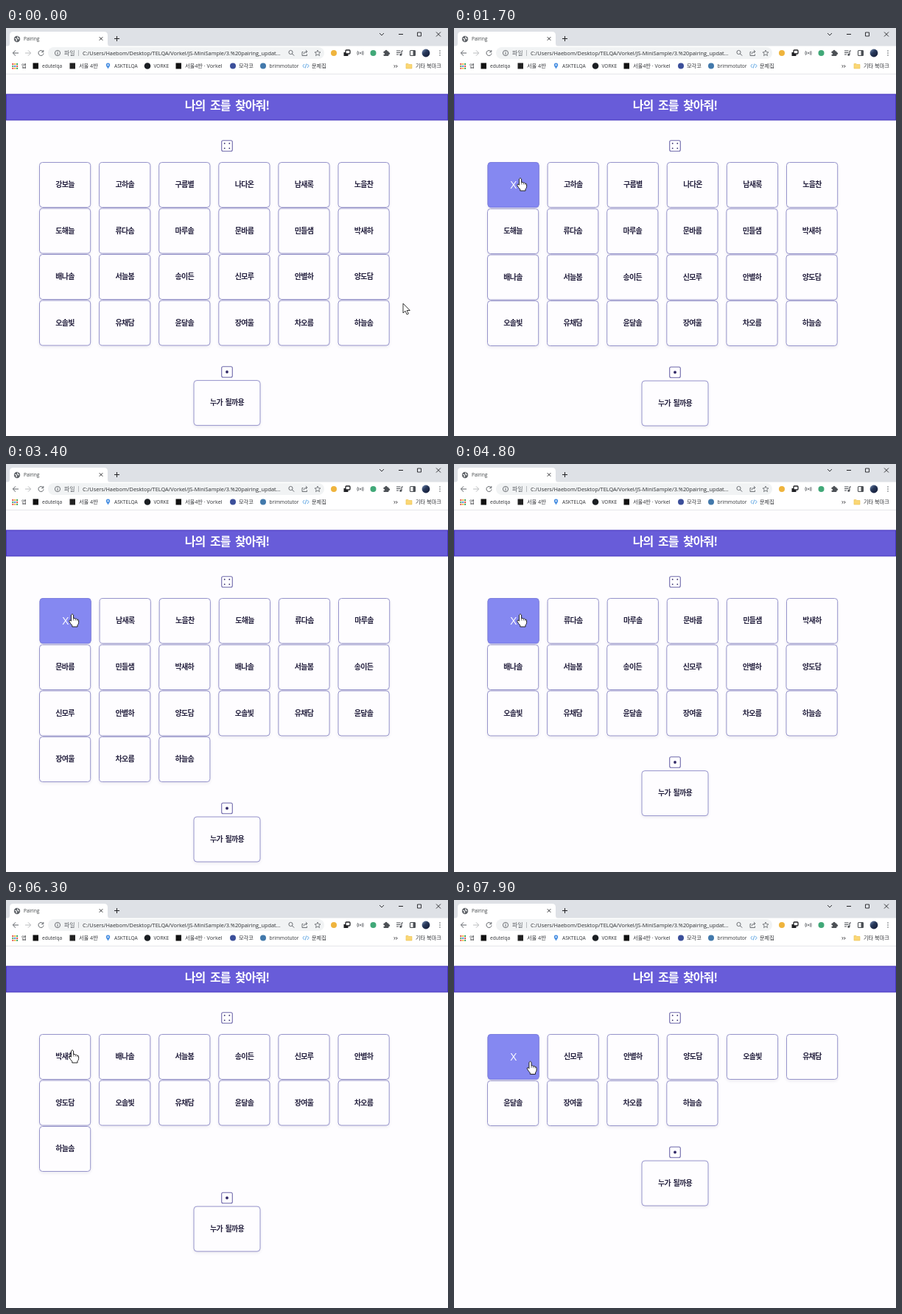
Recreate the animation shown at these times as an HTML page with a canvas. Size 600 by 554 pixels, loop 8 s.

```html
<!DOCTYPE html>
<html lang="ko">
<head>
<meta charset="utf-8">
<title>Pairing</title>
<style>
html, body { margin: 0; width: 100%; height: 100%; overflow: hidden; background: #fefdff; }
canvas { display: block; }
</style>
</head>
<body>
<canvas id="stage" width="600" height="554"></canvas>
<script>
const c = document.getElementById('stage').getContext('2d');
const LOOP = 8000;
const INK = '#5f6368', DARK = '#202124', PAGE = '#fefdff', LINE = '#8b88c6';
const KR = '"Noto Sans CJK KR", "Noto Sans CJK", sans-serif';
const UI = '"Open Sans", ' + KR;
const names = ('강보늘 고하솔 구름별 나다온 남새록 노을찬 도해늘 류다솜 마루솔 문바름 민들샘 박새하 ' +
  '배나솔 서늘봄 송이든 신모루 안별하 양도담 오솔빛 유채담 윤달솔 장여울 차오름 하늘솜').split(' ');
const clicks = [2000, 2750, 3100, 3750, 4100, 4450, 5000, 5300, 5600, 5900, 6220, 6700, 7050, 7400];

// pointer path: time, x, y
const path = [[0, 539, 374], [150, 539, 374], [850, 242, 134], [950, 242, 134],
  [1500, 90, 203.5], [7500, 90, 203.5], [7800, 103.5, 219]];

const clamp = v => Math.max(0, Math.min(1, v));

function pointer(t) {
  let i = 0;
  while (i < path.length - 1 && path[i + 1][0] <= t) i++;
  const a = path[i], b = path[i + 1] || a;
  const p = b === a ? 0 : (t - a[0]) / (b[0] - a[0]);
  const e = p * p * (3 - 2 * p);
  return [a[1] + (b[1] - a[1]) * e, a[2] + (b[2] - a[2]) * e];
}

function text(s, x, y, font, color = DARK, align = 'left', spacing = 0, words = 0) {
  c.font = font;
  c.textAlign = align;
  c.letterSpacing = spacing + 'px';
  c.wordSpacing = words + 'px';
  c.fillStyle = color;
  c.fillText(s, x, y);
}

function rect(x, y, w, h, fill) {
  c.fillStyle = fill;
  c.fillRect(x, y, w, h);
}

function round(x, y, w, h, r, fill, line, width = 1) {
  c.beginPath();
  c.roundRect(x, y, w, h, r);
  paint(fill, line, width);
}

function dot(x, y, r, fill, line, width = 1) {
  c.beginPath();
  c.arc(x, y, r, 0, 7);
  paint(fill, line, width);
}

function paint(fill, line, width) {
  if (fill) { c.fillStyle = fill; c.fill(); }
  if (line) { c.strokeStyle = line; c.lineWidth = width; c.stroke(); }
}

function shape(d, x, y, fill, line, width = 1) {
  const p = new Path2D(d);
  c.save();
  c.translate(x, y);
  c.lineJoin = 'round';
  if (fill) { c.fillStyle = fill; c.fill(p); }
  if (line) { c.strokeStyle = line; c.lineWidth = width; c.stroke(p); }
  c.restore();
}

const icon = (d, x, y, color = INK, width = 1) => shape(d, x, y, null, color, width);

function tabStrip() {
  rect(0, 0, 600, 25, '#dee1e6');
  shape('M0 20 Q4 20 4 16 V5 Q4 0 9 0 H132 Q137 0 137 5 V16 Q137 20 141 20 Z', 1, 5, '#fff');
  dot(15, 15, 4.2, INK);
  icon('M-3 -1 L-.5 .2 L-1 3 M1 -3.5 L.7 -1 L3 0', 15, 15, '#fff', 1.1);
  text('Pairing', 24, 17.3, '6.6px ' + UI, '#3c4043');
  icon('M-2.3 -2.3 L2.3 2.3 M2.3 -2.3 L-2.3 2.3', 129, 14.5, DARK, .9);
  icon('M-3.5 0 H3.5 M0 -3.5 V3.5', 150.5, 14.5, DARK);
  icon('M-3 -1.5 L0 1.5 L3 -1.5', 510, 8.5, DARK, .9);
  icon('M-3 0 H3', 536, 8.5, DARK);
  icon('M-2.5 -2.5 H2.5 V2.5 H-2.5 Z', 561, 8.5, DARK, .9);
  icon('M-3 -3 L3 3 M3 -3 L-3 3', 587, 8.5, DARK, .9);
}

function toolbar() {
  rect(0, 24.5, 600, 38, '#fff');
  icon('M4 0 H-3.5 M0 -3.7 L-3.7 0 L0 3.7', 13, 34);
  icon('M-4 0 H3.5 M0 -3.7 L3.7 0 L0 3.7', 30, 34, '#babcbe');
  icon('M2.5 -2.5 A3.5 3.5 0 1 0 3.5 .5 M3.3 -4 V-1.3 H.6', 47.5, 34);
  round(57, 26, 375, 16, 8, '#f1f3f4');
  dot(70, 34, 3.6, null, INK, .9);
  icon('M0 -2 V-1 M0 -.4 V2.1', 70, 34);
  text('파일', 79, 36.8, '8px ' + KR, INK);
  rect(98, 30, 1, 8, '#b8bbbf');
  text('C:/Users/Haebom/Desktop/TELQA/Vorkel/JS-MiniSample/3.%20pairing_updat...',
    104, 36.8, '7.35px ' + UI, '#2c2e31');
  dot(386.5, 33, 2.6, null, INK, .9);
  icon('M0 0 L2.6 2.6', 388.5, 35);
  icon('M-2 -1.5 H-3.5 V3.5 H3 V1.5 M-1.5 1.5 Q-1 -2 3 -2 M1.4 -4 L3.5 -2 L1.4 0', 405.5, 34, INK, .9);
  icon('M0 -4 L1.1 -1.3 L4 -1.1 L1.8 .8 L2.5 3.6 L0 2 L-2.5 3.6 L-1.8 .8 L-4 -1.1 L-1.1 -1.3 Z', 423, 34, INK, .8);

  dot(445, 34, 4, '#efb43d');
  rect(458.5, 33, 6, 5, DARK);
  round(461, 30, 6, 5, 1, '#fff', DARK, 1.3);
  dot(481, 34, 1, INK);
  icon('M-2 -2 Q-3.2 0 -2 2 M2 -2 Q3.2 0 2 2 M-3.4 -3 Q-5.2 0 -3.4 3 M3.4 -3 Q5.2 0 3.4 3', 481, 34, INK, .8);
  dot(498.5, 34, 4, '#41a878');
  round(512.5, 31.5, 7, 6.5, 1, '#4d5156');
  dot(516, 31.3, 1.6, '#4d5156');
  dot(519.5, 34.6, 1.6, '#4d5156');
  dot(513, 35, 1.1, '#fff');
  icon('M-4 -3 H1.5 M-4 -.5 H1.5 M-4 2 H-1 M3 -3 V2 M3 -3 H5', 534, 34, '#4d5156', 1.1);
  dot(535.8, 36.2, 1.5, '#4d5156');
  round(548.5, 30.5, 7, 7, 1, '#fff', '#4d5156', 1.1);
  rect(552.5, 30.5, 3, 7, '#4d5156');
  const sky = c.createLinearGradient(565, 29, 574, 39);
  sky.addColorStop(0, '#6f86ad');
  sky.addColorStop(.45, '#263759');
  sky.addColorStop(1, '#151d38');
  dot(570, 34, 5.4, sky);
  for (const y of [31, 34, 37]) dot(589, y, .8, INK);
}

function bookmarks() {
  const label = (s, x) => text(s, x, 54, (/[가-힣]/.test(s) ? 7.2 : 6.6) + 'px ' + UI, '#303236');
  const hues = ['#e0483e', '#3f7de0', '#35a35a', '#f0b52f'];
  for (let i = 0; i < 9; i++)
    rect(8.3 + i % 3 * 2.9, 48 + (i / 3 | 0) * 2.9, 2, 2, hues[(i * 3 + (i / 3 | 0)) % 4]);
  label('앱', 21);
  rect(36.5, 47.5, 7.5, 8, '#111');
  label('edutelqa', 49);
  rect(86.5, 47.5, 7.5, 8, '#222');
  label('서울 4반', 99);
  shape('M0 4 C-1 1.5 -2.7 .8 -2.7 -1.3 A2.7 2.7 0 0 1 2.7 -1.3 C2.7 .8 1 1.5 0 4 Z', 138.5, 51.5, '#4a90e2');
  dot(138.5, 50.2, 1, '#fff');
  label('ASKTELQA', 147);
  dot(192, 51.5, 4.3, '#1b1f23');
  label('VORKE', 200.5);
  rect(230.5, 47.5, 7.5, 8, '#111');
  label('서울4반 · Vorkel', 243);
  dot(308, 51.5, 4, '#3b4f9a');
  label('모각코', 316);
  dot(349, 51.5, 4, '#4279ab');
  label('brimmotutor', 357.5);
  icon('M-2 -2.5 L-4 0 L-2 2.5 M2 -2.5 L4 0 L2 2.5 M.8 -3 L-.8 3', 407, 51.5, '#4d9be0', .9);
  label('문제집', 415);
  icon('M-2.3 -1.7 L-.6 0 L-2.3 1.7 M.5 -1.7 L2.2 0 L.5 1.7', 529, 52, DARK, .9);
  shape('M-4 -3 H-1 L0 -2 H4 V3.5 H-4 Z', 547, 51.5, '#fbd775', '#e9bf50', .6);
  label('기타 북마크', 556);
  rect(0, 62, 600, 1, '#e6e6ea');
}

function banner() {
  rect(0, 89.5, 600, 36, '#4330bd');
  rect(.8, 90.5, 598.4, 34, '#685cd9');
  text('나의 조를 찾아줘!', 300, 110.7, '900 16px ' + KR, '#fff', 'center', -1, 4);
}

function die(x, y, offsets, r) {
  round(x - 7.3, y - 7.3, 14.6, 14.6, 2, PAGE, '#6f69ab', 1.1);
  for (const dx of offsets) for (const dy of offsets) dot(x + dx, y + dy, r, '#332b68');
}

function card(x, y, w, label, hover = 0) {
  c.save();
  c.shadowColor = 'rgba(40,30,90,.1)';
  c.shadowBlur = 4;
  c.shadowOffsetY = 2;
  round(x, y, w, 61, 4, PAGE);
  c.restore();
  round(x, y, w, 61, 4, PAGE, LINE, .9);
  if (hover) {
    c.globalAlpha = hover;
    round(x, y, w, 61, 4, '#8588f1', '#7b7ddf', .9);
    c.globalAlpha = 1;
  }
  const mid = x + w / 2;
  if (hover > .5) text('X', mid + .3, y + 35.7, '15px ' + UI, '#fff', 'center');
  else text(label, mid, y + 33.8, '900 10px ' + KR, '#25213f', 'center', -.7, 2);
}

function cursor(x, y, hand) {
  if (hand) {
    shape('M-1.6 1.5 Q0 -1.2 1.6 1.5 V6.2 Q3.2 5.2 4.2 6.8 Q5.6 6 6.6 7.6 Q8.6 7.2 8.6 9.5 ' +
      'V12 Q8.6 14 7 15.2 V17.5 H-.2 V15.8 Q-2.4 13.5 -4.2 10.2 Q-4.6 8.3 -2.6 8.6 L-1.6 9.8 Z',
      x, y, '#fff', '#222', 1);
    icon('M1.6 6.2 V9 M4.2 6.8 V9.2 M6.6 7.6 V9.6', x, y, '#444', .7);
  } else {
    shape('M0 0 V13 L3 10.2 L5.2 15 L7.4 14 L5.2 9.5 H9.3 Z', x, y, '#fff', '#222', .9);
  }
}

function draw(t) {
  rect(0, 0, 600, 554, PAGE);
  tabStrip();
  toolbar();
  bookmarks();
  banner();

  const gone = clicks.filter(at => at <= t).length;
  const left = names.slice(gone);
  const [px, py] = pointer(t);
  const over = px > 45 && px < 115 && py > 182 && py < 244;
  const since = gone ? t - clicks[gone - 1] - 120 : t - 1400;
  const hover = over ? clamp(since / 100) : 0;
  const nudge = hover * .5;

  die(300, 160, [-3.3, 3.3], .9);
  left.forEach((name, i) => {
    const col = i % 6, row = i / 6 | 0;
    card(45.5 + col * 81.1 + (row ? 0 : nudge), 182.5 + row * 62.5 + (row ? nudge : 0),
      69.2, name, i ? 0 : hover);
  });

  const rows = Math.ceil(left.length / 6);
  const foot = 217 + rows * 62.5 + nudge;
  die(300, foot, [0], 1.9);
  card(255, foot + 11.6, 90, '누가 될까용');
  cursor(px, py, over);
}

function tick(now) {
  draw(now % LOOP);
  requestAnimationFrame(tick);
}
requestAnimationFrame(tick);
</script>
</body>
</html>
```
